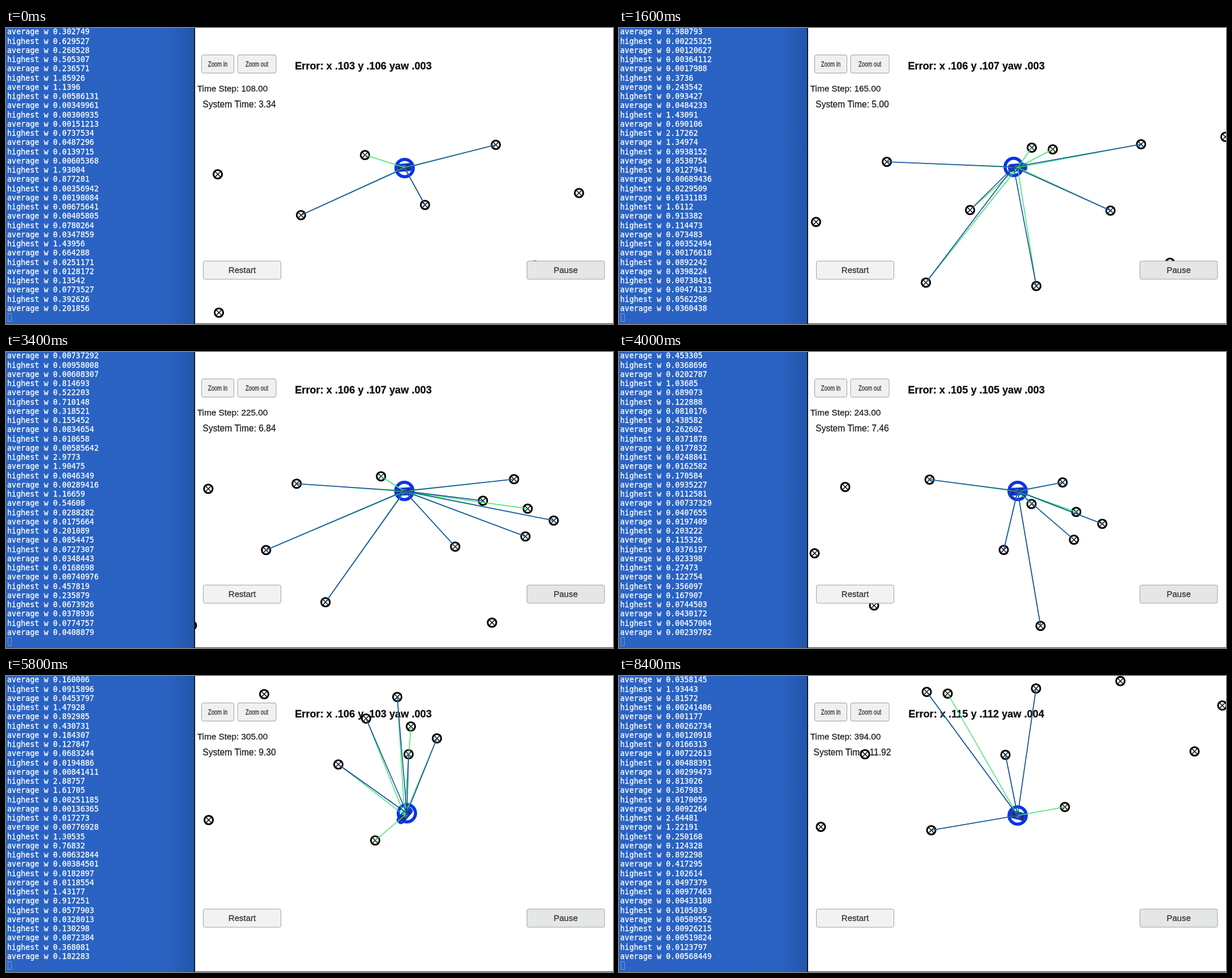
Recreate the animation shown at these times as an HTML page with a canvas. Size 1072 px wide and 522 px high, loop 8600 ms.

```html
<!DOCTYPE html>
<html lang="en">
<head>
<meta charset="utf-8">
<title>Particle filter simulator</title>
<style>
html, body { margin: 0; width: 100%; height: 100%; overflow: hidden; background: #fff; }
canvas { display: block; width: 1072px; height: 522px; }
</style>
</head>
<body>
<canvas id="stage" width="1072" height="522"></canvas>
<script>
const ctx = document.getElementById('stage').getContext('2d');
const SANS = '"Liberation Sans", Arial, sans-serif';
const MONO = '"DejaVu Sans Mono", monospace';
const LOOP = 8600, TICK = 200, END = 8400;
const CAR = { x: 704, y: 246 }, RANGE = 275, LOG_ROWS = 31;

// Fixed map, in stage coordinates at time 0
const landmarks = [
  [374, 258], [634, 224], [865, 206], [521, 330], [740, 312], [1012, 291],
  [376, 502], [1121, 181], [1158, 184], [1260, 292], [1314, 175], [1365, 384],
  [1463, 162], [934, 419], [1129, 425], [1594, 286], [1643, 205], [1659, 420],
  [1698, 167], [1718, 268], [1722, 219], [1768, 240]
];

// The drive: distance moved (x, y), heading in degrees, lag of the ring (dx, dy)
const waypoints = [
  { t: 0,    step: 108, clock: 3.34,  ex: .103, ey: .106, x: 0,     y: 0,   head: -4.4, dx: 0,  dy: 1 },
  { t: 1600, step: 165, clock: 5,     ex: .106, ey: .107, x: 392,   y: -30, head: -4.3, dx: -7, dy: -1 },
  { t: 2600, step: 200, clock: 6.02,  ex: .108, ey: .110, x: 649,   y: -49, head: -3.5, dx: -1, dy: -1 },
  { t: 4000, step: 243, clock: 7.46,  ex: .105, ey: .105, x: 914.5, y: -63, head: -3,   dx: 0,  dy: -1 },
  { t: 5800, step: 305, clock: 9.3,   ex: .106, ey: .103, x: 1007,  y: 130, head: 131,  dx: 4,  dy: -4 },
  { t: 7000, step: 346, clock: 10.52, ex: .113, ey: .107, x: 843,   y: 200, head: 183,  dx: 4,  dy: 1 },
  { t: 8400, step: 394, clock: 11.92, ex: .115, ey: .112, x: 577.5, y: 153, head: 195,  dx: 0,  dy: 0 }
];

const radians = deg => deg * Math.PI / 180;

function stateAt(t) {
  let i = 0;
  while (i < waypoints.length - 2 && t >= waypoints[i + 1].t) i++;
  const a = waypoints[i], b = waypoints[i + 1];
  const u = (t - a.t) / (b.t - a.t);
  const s = {};
  for (const key in a) s[key] = a[key] + (b[key] - a[key]) * u;
  s.step = Math.round(s.step);

  // Cubic Hermite curve; this tangent length makes every turn close to an arc
  const turn = radians(b.head - a.head);
  const reach = Math.hypot(b.x - a.x, b.y - a.y) / Math.cos(turn / 4) ** 2;
  const u2 = u * u, u3 = u2 * u;
  const curve = (key, fn) =>
    (2 * u3 - 3 * u2 + 1) * a[key] + (3 * u2 - 2 * u3) * b[key] +
    reach * ((u3 - 2 * u2 + u) * fn(radians(a.head)) + (u3 - u2) * fn(radians(b.head)));
  s.x = curve('x', Math.cos);
  s.y = curve('y', Math.sin);
  return s;
}

function noise(n) {
  const v = Math.sin(n * 12.9898) * 43758.5453;
  return v - Math.floor(v);
}

// Every step logs its highest weight (even line) and its average (odd line).
function logLine(n) {
  const step = n >> 1, average = n % 2;
  const highest = 10 ** (noise(step) * 3.2 - 2.7);
  const value = average ? highest * (.42 + .25 * noise(step + .5)) : highest;
  return `${average ? 'average' : 'highest'} w ${Number(value.toPrecision(6))}`;
}

// The thin outline gives the text the heavier look of smoothed screen fonts.
function text(str, x, y, font, color = '#222', align = 'center') {
  ctx.font = font;
  ctx.fillStyle = ctx.strokeStyle = color;
  ctx.lineWidth = .3;
  ctx.textAlign = align;
  ctx.fillText(str, x, y);
  ctx.strokeText(str, x, y);
}

function line(x1, y1, x2, y2, color, width) {
  ctx.strokeStyle = color;
  ctx.lineWidth = width;
  ctx.beginPath();
  ctx.moveTo(x1, y1);
  ctx.lineTo(x2, y2);
  ctx.stroke();
}

function ring(x, y, r, color, width) {
  ctx.beginPath();
  ctx.arc(x, y, r, 0, 7);
  ctx.fillStyle = '#fff';
  ctx.fill();
  ctx.strokeStyle = color;
  ctx.lineWidth = width;
  ctx.stroke();
}

function button(label, x, y, w, h, fill, size, squeeze = 1) {
  ctx.beginPath();
  ctx.roundRect(x + .5, y + .5, w - 1, h - 1, 3);
  ctx.fillStyle = fill;
  ctx.fill();
  ctx.strokeStyle = '#a0a0a0';
  ctx.lineWidth = 1;
  ctx.stroke();
  ctx.save();
  ctx.translate(x + w / 2, y + h / 2 + size * .36);
  ctx.scale(squeeze, 1);
  text(label, 0, 0, `${size}px ${SANS}`, '#333');
  ctx.restore();
}

function drawLandmark(x, y) {
  ring(x, y, 7.6, '#000', 3);
  line(x - 4.5, y - 4.5, x + 4.5, y + 4.5, '#000', 1.4);
  line(x - 4.5, y + 4.5, x + 4.5, y - 4.5, '#000', 1.4);
}

function drawCar(s) {
  ring(CAR.x + s.dx, CAR.y + s.dy, 15.2, '#0a32ea', 5.6);
  ctx.save();
  ctx.translate(CAR.x, CAR.y);
  ctx.rotate(radians(s.head));
  ctx.fillStyle = '#1238d8';
  ctx.beginPath();
  ctx.roundRect(-17, -7, 34, 14, 5);
  ctx.fill();
  ctx.fillStyle = '#26304c';
  ctx.fillRect(-11, -5, 4, 10);
  ctx.fillRect(4, -5, 5, 10);
  ctx.fillStyle = '#667';
  ctx.fillRect(-4, -4, 6, 3);
  ctx.restore();
}

function drawWorld(s) {
  const shown = landmarks.map(([x, y]) => ({ x: x - s.x, y: y - s.y }));
  for (const p of shown) {
    p.range = Math.hypot(p.x - CAR.x, p.y - CAR.y);
    drawLandmark(p.x, p.y);
  }
  drawCar(s);

  // Green: true sight lines. Blue: matches, missing for the nearest landmark
  // and for one that stands close behind another.
  const seen = shown.filter(p => p.range < RANGE);
  const nearest = Math.min(...seen.map(p => p.range));
  const crowded = (p, i) =>
    seen.slice(0, i).some(q => Math.hypot(p.x - q.x, p.y - q.y) < 50);
  const matched = seen.filter((p, i) => p.range > nearest && !crowded(p, i));
  for (const p of seen) line(CAR.x, CAR.y, p.x, p.y, '#35e868', 1.5);
  for (const p of matched)
    line(CAR.x + s.dx, CAR.y + s.dy, p.x, p.y, '#1c48a8', 1.6);
}

function drawTerminal(step) {
  const shade = ctx.createLinearGradient(0, 0, 333, 0);
  shade.addColorStop(0, '#2a63c3');
  shade.addColorStop(.87, '#2962c1');
  shade.addColorStop(1, '#2355aa');
  ctx.fillStyle = shade;
  ctx.fillRect(0, 0, 333, 522);
  ctx.fillStyle = '#10182c';
  ctx.fillRect(332, 0, 2, 522);
  const first = 2 * step + 2 - LOG_ROWS;
  for (let i = 0; i < LOG_ROWS; i++)
    text(logLine(first + i), 2, 11.3 + i * 16.25, `13.45px ${MONO}`, '#fff', 'left');
  ctx.strokeStyle = '#7f9bc9';
  ctx.lineWidth = 1;
  ctx.strokeRect(3.5, 503.5, 6, 14);
}

function draw(t) {
  const s = stateAt(t);
  const decimals = v => v.toFixed(3).slice(1);
  ctx.fillStyle = '#fff';
  ctx.fillRect(0, 0, 1072, 522);
  // The yaw error grows with the x error.
  text(`Error: x ${decimals(s.ex)} y ${decimals(s.ey)} yaw ${decimals(s.ex / 31)}`,
    631, 73, `bold 18.2px ${SANS}`, '#111');
  text(`Time Step: ${s.step.toFixed(2)}`, 400, 112, `15.3px ${SANS}`);
  text(`System Time: ${s.clock.toFixed(2)}`, 412, 140, `15.6px ${SANS}`);
  drawWorld(s);
  button('Zoom in', 345, 47, 58, 33, '#f0f0f0', 12.5, .76);
  button('Zoom out', 408.5, 47, 69, 33, '#f0f0f0', 12.5, .76);
  button('Restart', 348, 410.5, 138, 33, '#f2f2f2', 15);
  button('Pause', 919.5, 410.5, 138, 33, '#e5e7e6', 15);
  ctx.fillStyle = '#333';
  ctx.fillRect(333, 521, 739, 1);
  drawTerminal(s.step);
}

function frame() {
  const t = performance.now() % LOOP;
  draw(Math.min(Math.floor(t / TICK) * TICK, END));
  requestAnimationFrame(frame);
}
frame();
</script>
</body>
</html>
```
